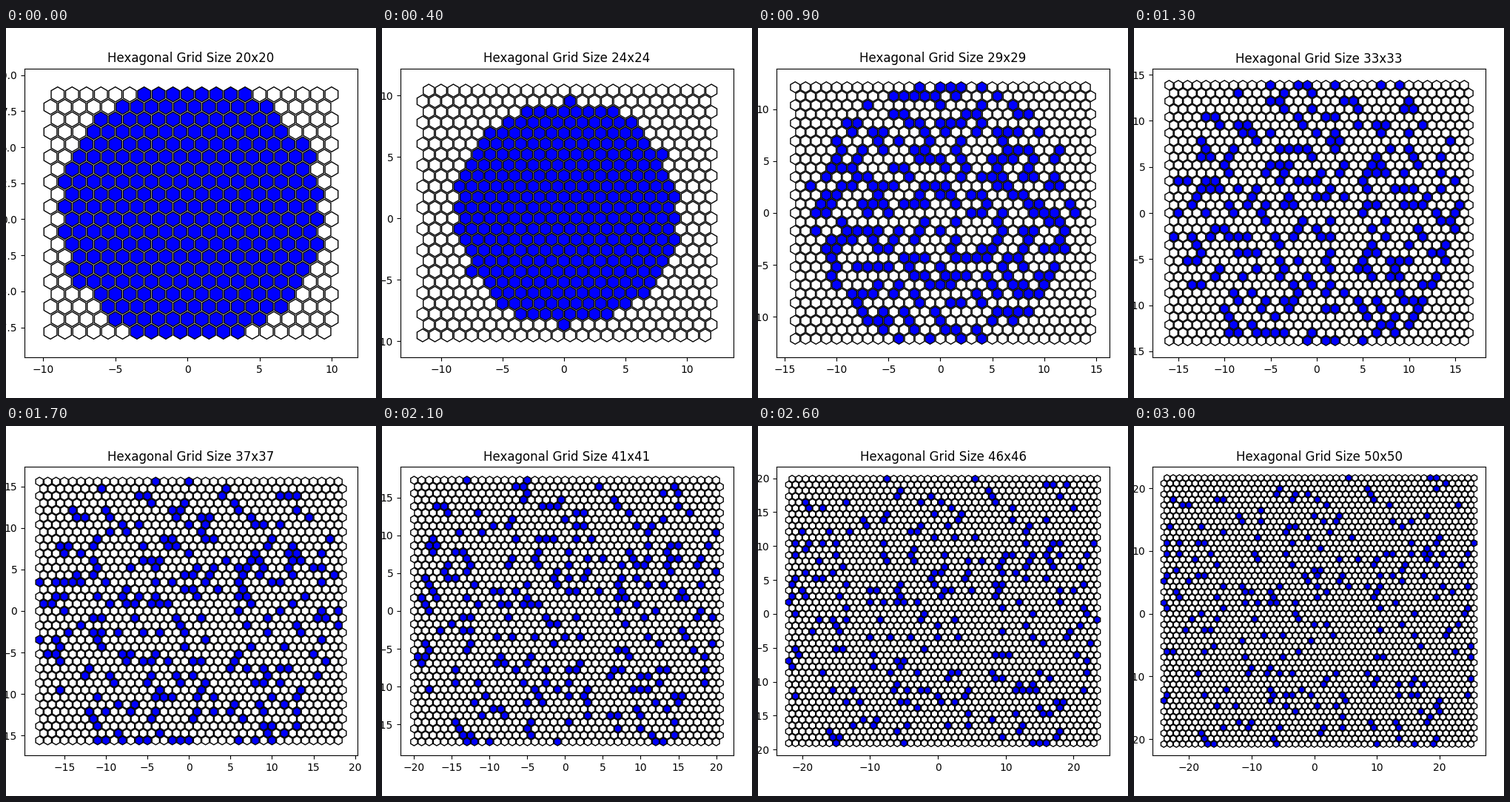
A matplotlib script that plays this animation: 500 by 500 pixels, repeating every 3100 ms.

```python
import numpy as np
import matplotlib.pyplot as plt
from matplotlib.animation import FuncAnimation
from matplotlib.collections import PolyCollection

SIZES = range(20, 51)
BREAK_SIZE = 24      # last grid on which the disc is still packed
DISC_RADIUS = 9.1
GROWTH = 0.77        # outward speed of the rim, cells per frame
DIAM = 0.9           # hexagon width; centres are one unit apart
ROW = np.sqrt(3) / 2

angles = np.radians(90 + 60 * np.arange(6))
HEXAGON = DIAM / np.sqrt(3) * np.column_stack([np.cos(angles), np.sin(angles)])


def hex_centres(n):
    """Centres of an n by n grid, row by row, with a middle cell at the origin."""
    col, row = np.meshgrid(np.arange(n), np.arange(n))
    half = (n + 1) // 2
    x = col + 0.5 * (row % 2) - (half - 1) - 0.5 * (half % 2 == 0)
    y = (row - half + 1) * ROW
    return np.column_stack([x.ravel(), y.ravel()])


def from_middle(centres):
    return centres - centres.mean(axis=0)


def make_particles():
    """Packed start positions and the outward drift of each particle."""
    rng = np.random.default_rng(7)
    offsets = from_middle(hex_centres(BREAK_SIZE))
    home = offsets[np.hypot(*offsets.T) < DISC_RADIUS]
    target = home / DISC_RADIUS + rng.normal(0, 0.17, home.shape)
    radius = np.minimum(np.hypot(*target.T), 1)
    theta = np.arctan2(target[:, 1], target[:, 0])
    theta -= 0.1 * np.sin(5 * theta - 2)    # gathers the drift into loose rays
    drift = radius[:, None] * np.column_stack([np.cos(theta), np.sin(theta)])
    return home, drift * GROWTH


HOME, DRIFT = make_particles()


def filled_cells(n, centres):
    offsets = from_middle(centres)
    if n <= BREAK_SIZE:
        dist = np.hypot(*offsets.T).round(6)
        return np.argsort(dist, kind="stable")[:len(HOME)]
    pos = HOME + DRIFT * (n - BREAK_SIZE)
    gaps = np.hypot(pos[:, None, 0] - offsets[:, 0],
                    pos[:, None, 1] - offsets[:, 1])
    return gaps.argmin(axis=1)[gaps.min(axis=1) < 0.6]


fig = plt.figure(figsize=(5, 5), dpi=100)
ax = fig.add_axes([0.05, 0.05, 0.9, 0.9])


def draw(frame):
    n = SIZES[frame]
    centres = hex_centres(n)
    colors = np.ones((len(centres), 3))
    colors[filled_cells(n, centres)] = (0, 0, 1)

    ax.clear()
    ax.add_collection(PolyCollection(
        centres[:, None] + HEXAGON, facecolors=colors, edgecolors="black",
        linewidths=1, joinstyle="miter"))
    low = centres.min(axis=0) - 2 * DIAM
    high = centres.max(axis=0) + 2 * DIAM
    ax.set_aspect("equal")
    ax.axis([low[0], high[0], low[1], high[1]])
    ax.set_title(f"Hexagonal Grid Size {n}x{n}")
    return ax.collections


anim = FuncAnimation(fig, draw, frames=len(SIZES), init_func=lambda: [],
                     interval=100, repeat=True, repeat_delay=0)
plt.show()
```
